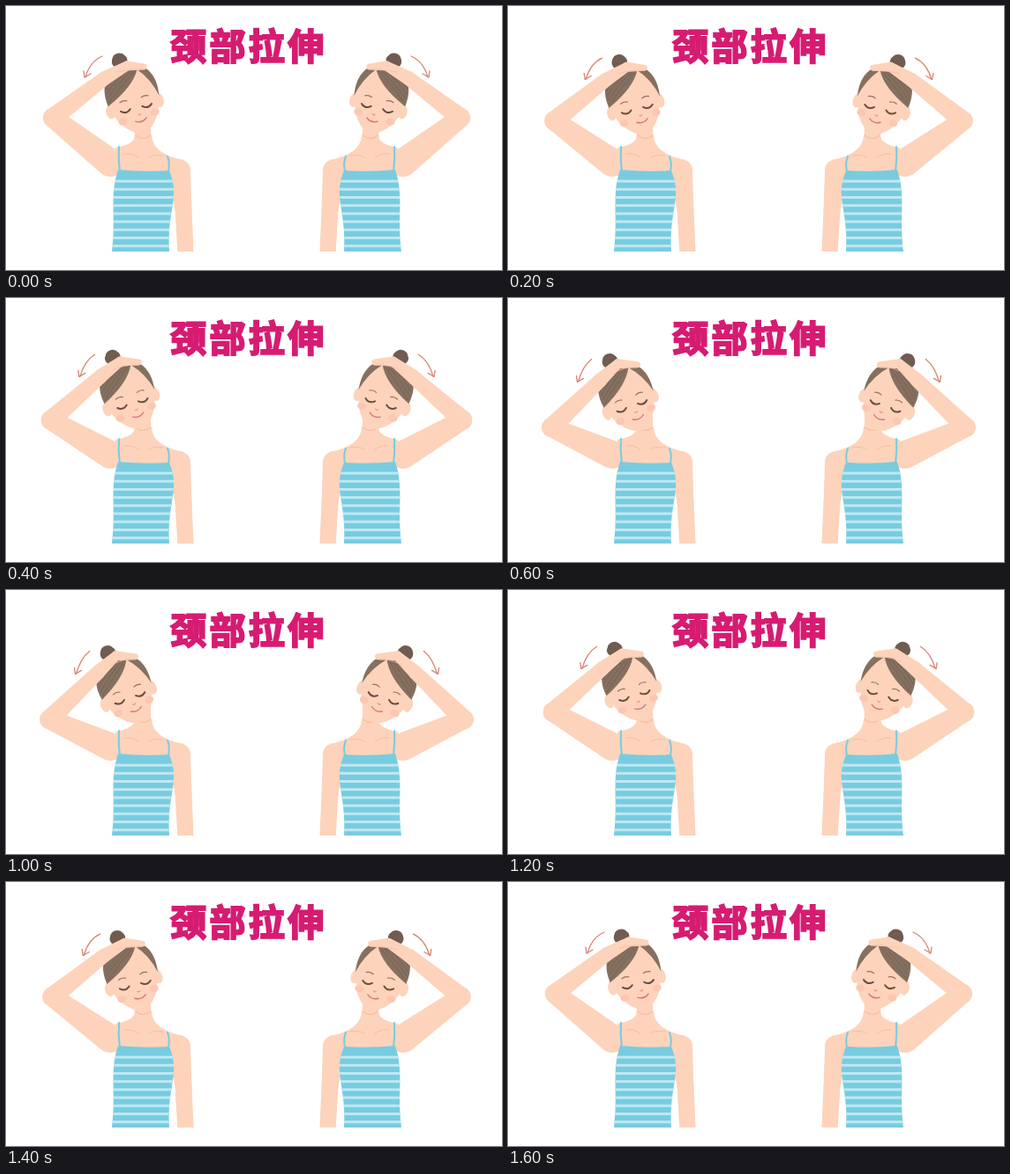
An HTML page with a canvas for the animation above (1.8 s loop, 562 px wide and 300 px high).

```html
<!DOCTYPE html>
<html lang="zh">
<head>
<meta charset="utf-8">
<style>
html, body { margin: 0; width: 100%; height: 100%; overflow: hidden; background: #fff; }
canvas { display: block; }
</style>
</head>
<body>
<canvas id="stage" width="562" height="300"></canvas>
<script>
const ctx = document.getElementById('stage').getContext('2d');
const SKIN = '#fdd3bb', SHADE = '#f6bea5', CHEEK = '#fcc6b2';
const HAIR = '#857060', BUN = '#705c50', INK = '#6a4c42';
const BLUE = '#78cce0', PALE = '#bfe8f1';
const STEP = 200, POSES = 9, MAX_LEAN = 1.12;

const mix = (a, b, u) => a + (b - a) * u;
const between = (a, b, u) => a.map((v, i) => mix(v, b[i], u));

function oval(x, y, rx, ry, color) {
  ctx.beginPath();
  ctx.ellipse(x, y, rx, ry, 0, 0, Math.PI * 2);
  ctx.fillStyle = color;
  ctx.fill();
}

function curve(x1, y1, cx, cy, x2, y2, color, width) {
  ctx.beginPath();
  ctx.moveTo(x1, y1);
  ctx.quadraticCurveTo(cx, cy, x2, y2);
  ctx.strokeStyle = color;
  ctx.lineWidth = width;
  ctx.stroke();
}

// Tapered rounded segments through joints given as [x, y, radius].
function limb(...joints) {
  ctx.fillStyle = SKIN;
  joints.slice(1).forEach(([x2, y2, r2], i) => {
    const [x1, y1, r1] = joints[i];
    const side = Math.atan2(y2 - y1, x2 - x1) + Math.PI / 2;
    ctx.beginPath();
    ctx.arc(x1, y1, r1, side, side + Math.PI);
    ctx.arc(x2, y2, r2, side + Math.PI, side);
    ctx.fill();
  });
}

function drawBody() {
  limb([155, 135, 9], [155, 168, 10]);
  ctx.beginPath();
  ctx.moveTo(146, 147);
  ctx.quadraticCurveTo(146, 157, 124, 161);
  ctx.lineTo(126, 205);
  ctx.lineTo(187, 205);
  ctx.lineTo(201, 175);
  ctx.quadraticCurveTo(166, 168, 165, 147);
  ctx.fill();
  limb([196, 187, 13], [201, 232, 9.5], [204, 290, 9]);
  curve(147, 147, 155, 154, 164, 147, SHADE, 1.2);
  curve(134, 168, 143, 167, 150, 172, SHADE, 1);
  curve(162, 172, 168, 168, 178, 170, SHADE, 1);
}

function drawTop() {
  curve(128, 160, 127, 174, 129, 188, BLUE, 2);
  curve(183, 171, 186, 178, 184, 188, BLUE, 2);
  ctx.save();
  ctx.beginPath();
  ctx.moveTo(127, 186);
  ctx.quadraticCurveTo(156, 189, 185, 187);
  ctx.bezierCurveTo(198, 218, 182, 232, 185, 279);
  ctx.lineTo(120, 279);
  ctx.bezierCurveTo(125, 240, 117, 215, 127, 186);
  ctx.fillStyle = BLUE;
  ctx.fill();
  ctx.clip();
  ctx.fillStyle = PALE;
  for (let y = 197.6; y < 279; y += 9.2) ctx.fillRect(115, y, 80, 3);
  ctx.restore();
}

function drawFace() {
  oval(31, -47, 5, 8, SKIN);
  oval(-26, -47, 5, 8, SKIN);
  ctx.beginPath();
  ctx.moveTo(-26, -58);
  ctx.bezierCurveTo(-26, -35, -8, -15, 4, -15);
  ctx.bezierCurveTo(16, -15, 31, -33, 31, -58);
  ctx.bezierCurveTo(31, -104, -26, -104, -26, -58);
  ctx.fill();
  oval(-15, -33, 5, 4, CHEEK);
  oval(23, -35, 5, 4, CHEEK);
  for (const x of [-9, 16]) {
    curve(x - 5.5, -45, x, -40, x + 5.5, -45, INK, 2);
    curve(x - 4, -55, x, -57, x + 4, -55, '#9a705d', 1.2);
  }
  curve(4, -37, 5, -35, 7, -37, '#e59a86', 1.2);
  curve(-1, -30, 6, -26, 12, -31, '#d9757a', 1.4);
}

function drawHair() {
  ctx.beginPath();
  ctx.moveTo(-27, -54);
  ctx.bezierCurveTo(-36, -110, 42, -110, 32, -52);
  ctx.quadraticCurveTo(28, -72, 15, -87);
  ctx.quadraticCurveTo(6, -69, -27, -54);
  ctx.fillStyle = HAIR;
  ctx.fill();
  for (let i = 0; i < 4; i++) {
    curve(13 - 3 * i, -87 - i, -4 - 4 * i, -75 - 3 * i, -25, -58 - 5 * i, BUN, 0.6);
  }
}

function drawHead(u) {
  ctx.save();
  ctx.translate(155 - 2 * u, 160 + 6 * u);
  ctx.rotate(-(14 + 7 * u) * Math.PI / 180);
  oval(-2, -101, 9, 8, BUN);
  oval(-2, -105, 7, 5, BUN);
  drawFace();
  drawHair();
  ctx.restore();
}

function drawRaisedArm(u) {
  const elbow = between([53, 127, 11], [49, 148, 11], u);
  const wrist = between([112, 82, 8], [104, 94, 8], u);
  const knuckle = between([137, 68, 5.5], [124, 75, 5.5], u);
  const tip = between([156, 69, 3.5], [146, 76, 3.5], u);
  limb([118, 178, 16], elbow, wrist, knuckle, tip);
  curve(wrist[0] + 14, wrist[1] - 7, knuckle[0] + 6, knuckle[1] + 3, tip[0], tip[1] + 3, SHADE, 0.8);
}

function drawArrow(u) {
  const [x, y] = between([90, 81], [79, 96], u);
  const [startX, startY] = between([109, 57], [94, 70], u);
  const color = '#d98572';
  curve(startX, startY, x + 5, y - 18, x, y, color, 1.3);
  ctx.beginPath();
  ctx.moveTo(x - 2, y - 7);
  ctx.lineTo(x - 1, y);
  ctx.lineTo(x + 6, y - 4);
  ctx.stroke();
}

function drawFigure(u) {
  drawBody();
  drawHead(u);
  drawRaisedArm(u);
  drawTop();
  drawArrow(u);
}

function drawTitle() {
  ctx.font = '900 41px "Noto Sans CJK SC", "Noto Sans CJK", sans-serif';
  ctx.letterSpacing = '3.4px';
  ctx.fillStyle = ctx.strokeStyle = '#d61c72';
  ctx.lineWidth = 2;
  ctx.lineJoin = 'miter';
  ctx.fillText('颈部拉伸', 186, 61);
  ctx.strokeText('颈部拉伸', 186, 61);
}

// Eases down to the deepest lean at mid-loop and back, in held steps.
function leanAt(now) {
  const half = (POSES - 1) / 2;
  const pose = Math.floor(now / STEP) % POSES;
  return MAX_LEAN * (1 - Math.cos(Math.PI * pose / half)) / 2;
}

function draw(now) {
  const u = leanAt(now);
  ctx.fillStyle = '#fff';
  ctx.fillRect(0, 0, 562, 300);
  ctx.lineCap = ctx.lineJoin = 'round';
  ctx.save();
  ctx.beginPath();
  ctx.rect(0, 0, 562, 279);
  ctx.clip();
  drawFigure(u);
  ctx.translate(568, 0);
  ctx.scale(-1, 1);
  drawFigure(u);
  ctx.restore();
  drawTitle();
}

function tick() {
  draw(performance.now());
  requestAnimationFrame(tick);
}
tick();
</script>
</body>
</html>
```
